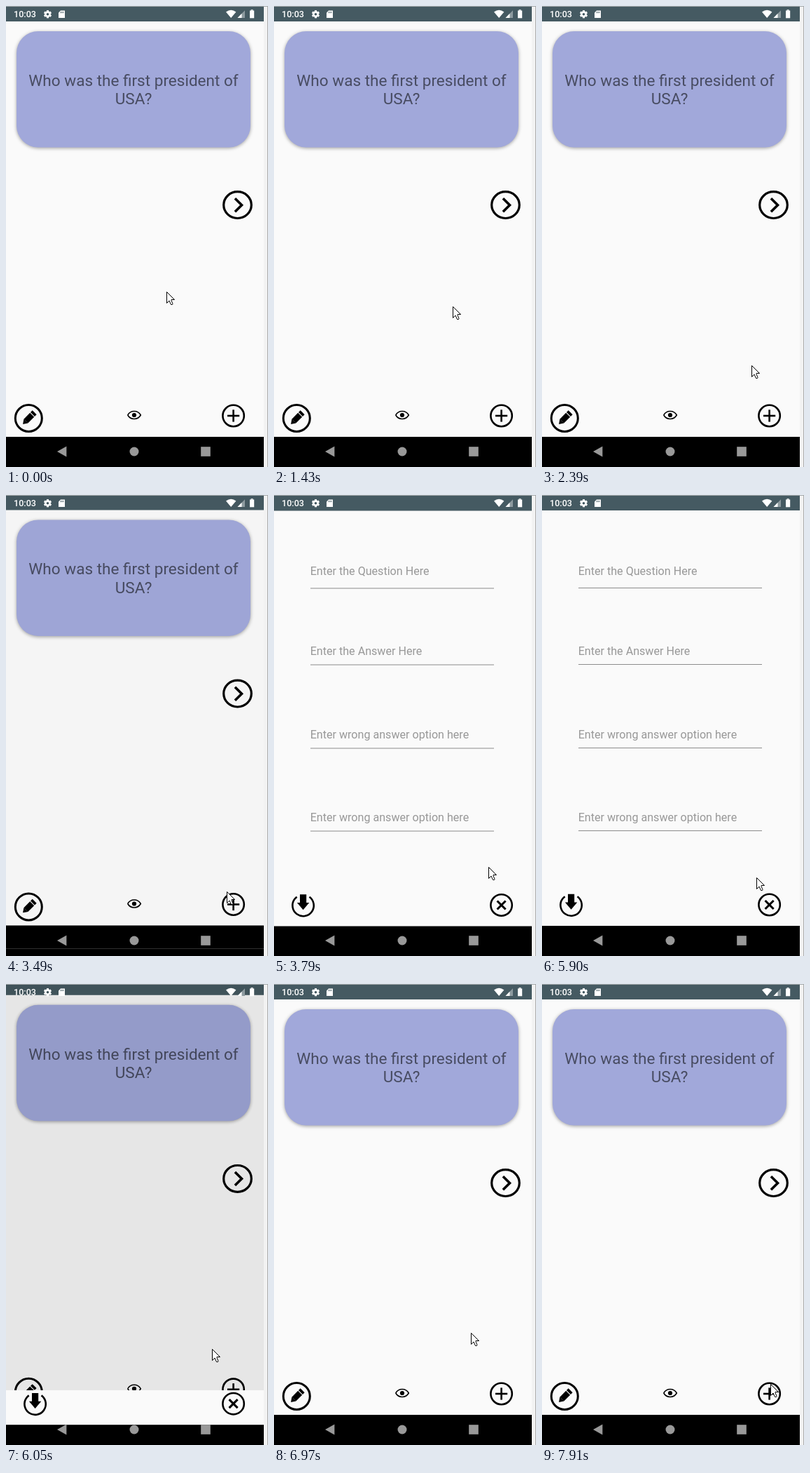
An HTML page with a canvas for the animation above (8 s loop, 374 by 657 pixels).

```html
<!DOCTYPE html>
<html lang="en">
<head>
<meta charset="utf-8">
<title>Flashcards</title>
<style>
html, body { margin: 0; width: 100%; height: 100%; overflow: hidden; background: #fafafa; }
canvas { display: block; width: 374px; height: 657px; }
</style>
</head>
<body>
<canvas id="stage"></canvas>
<script>
const W = 374, H = 657, PHONE = 368, LOOP = 8000;
const STATUS = '#455a62', PAGE = '#fafafa', INK = '#000', TAU = Math.PI * 2;
const canvas = document.getElementById('stage');
const ctx = canvas.getContext('2d');
const ratio = window.devicePixelRatio || 1;
canvas.width = W * ratio;
canvas.height = H * ratio;

const clamp = v => Math.min(1, Math.max(0, v));
const ease = u => u * u * (3 - 2 * u);

// Pointer strokes: a curve through start, middle and end; a single point is a rest.
const strokes = [
  { from: 0, path: [[229, 407]] },
  { from: 1280, to: 2090, path: [[239, 414], [278, 455], [291, 493]] },
  { from: 2240, to: 2960, path: [[294, 498], [306.5, 535], [316, 577]] },
  { from: 3490, to: 4150, path: [[315, 565], [304, 524], [300, 507]] },
  { from: 4830, to: 5460, path: [[305, 525], [316, 566], [322, 584]] },
  { from: 5900, to: 6320, path: [[306, 545], [289, 510], [280, 490]] },
  { from: 6970, to: 7630, path: [[281, 497], [302, 532], [326, 575]] },
  { from: 7910, path: [[326, 570]] }
];

function pointerAt(t) {
  const { from, to, path: [a, b, c] } = strokes.findLast(s => s.from <= t);
  if (!to) return a;
  const steps = Math.round((to - from) / 132);
  const p = Math.floor(clamp((t - from) / (to - from)) * steps) / steps;
  const wa = (2 * p - 1) * (p - 1), wb = 4 * p * (1 - p), wc = p * (2 * p - 1);
  return a.map((v, i) => Math.round(wa * v + wb * b[i] + wc * c[i]));
}

// The form slides over the card page and back, in held steps of 150 ms.
function slideAt(t) {
  const steps = from => Math.floor((t - from) / 150);
  const closing = t >= 5900;
  const u = clamp(closing ? 0.517 * steps(5900) : 0.12 + 0.4 * steps(3490));
  const shown = closing ? 1 - u : u;
  const open = ease(shown);
  const wiped = ease(ease(Math.min(1, u * 1.38)));
  const formY = 27 * (1 - open);
  return {
    cardY: -13.1 * open,
    formY,
    dim: 0.115 * Math.sin(shown * Math.PI / 2),
    clipTop: formY + 630 * (closing ? wiped : 1 - wiped),
    formVisible: shown > 0
  };
}

function rect(x, y, w, h, color) {
  ctx.fillStyle = color;
  ctx.fillRect(x, y, w, h);
}

function trace(points) {
  ctx.beginPath();
  points.forEach(([x, y]) => ctx.lineTo(x, y));
}

function stroke(width, color = INK) {
  ctx.lineWidth = width;
  ctx.strokeStyle = color;
  ctx.stroke();
}

function poly(points, color) {
  trace(points);
  ctx.closePath();
  ctx.fillStyle = color;
  ctx.fill();
}

function line(points, width) {
  trace(points);
  stroke(width);
}

function disc(x, y, r, color) {
  ctx.beginPath();
  ctx.arc(x, y, r, 0, TAU);
  ctx.fillStyle = color;
  ctx.fill();
}

function ring(x, y, rx, ry, width, from = 0, to = TAU) {
  ctx.beginPath();
  ctx.ellipse(x, y, rx, ry, 0, from, to);
  stroke(width);
}

function text(str, x, y, size, color, align = 'left', weight = 400) {
  ctx.font = `${weight} ${size}px Roboto, sans-serif`;
  ctx.textAlign = align;
  ctx.fillStyle = color;
  ctx.fillText(str, x, y);
}

function cross(x, y, r, width) {
  line([[x - r, y], [x + r, y]], width);
  line([[x, y - r], [x, y + r]], width);
}

function moved(x, y, angle, draw) {
  ctx.save();
  ctx.translate(x, y);
  ctx.rotate(angle);
  draw();
  ctx.restore();
}

function pageBase() {
  rect(0, 0, PHONE, H, PAGE);
  rect(0, -1, PHONE, 23, STATUS);
  rect(0, 614, PHONE, 80, INK);
}

function eye(x, y) {
  ctx.beginPath();
  ctx.moveTo(x - 9.3, y);
  ctx.bezierCurveTo(x - 5, y - 7.3, x + 5, y - 7.3, x + 9.3, y);
  ctx.bezierCurveTo(x + 5, y + 7.3, x - 5, y + 7.3, x - 9.3, y);
  stroke(1.6);
  disc(x, y, 3.1, INK);
}

function pencil() {
  rect(-6, -4.2, 12.5, 8.4, INK);
  rect(7.6, -4.2, 3.8, 8.4, INK);
  poly([[-6, -4.2], [-6, 4.2], [-12, 0]], INK);
}

function cardPage() {
  pageBase();
  ctx.save();
  ctx.shadowColor = 'rgba(0,0,0,.36)';
  ctx.shadowBlur = 5 * ratio;
  ctx.shadowOffsetY = 1.2 * ratio;
  ctx.beginPath();
  ctx.roundRect(15, 36, 334, 165.5, 31);
  ctx.fillStyle = '#a1a8da';
  ctx.fill();
  ctx.restore();
  text('Who was the first president of', 182, 114, 22.56, '#484c62', 'center');
  text('USA?', 182, 140.3, 22.56, '#484c62', 'center');

  ring(330.5, 283.6, 19.8, 18.9, 3.2);
  line([[326.9, 274.3], [336.5, 283.8], [326.9, 293.3]], 3.6);
  ring(32.3, 587.5, 19, 19, 3);
  moved(32.6, 587.4, -Math.PI / 4, pencil);
  eye(183, 583);
  ring(324.6, 584, 15.2, 15.2, 2.6);
  cross(324.6, 584, 8.6, 2.6);
}

function field(hint, under, gap) {
  text(hint, 51.7, under - gap, 16.1, '#989898');
  rect(52, under, 262, 1, '#8c8c8c');
}

function formPage() {
  pageBase();
  field('Enter the Question Here', 132, 18);
  field('Enter the Answer Here', 241, 13);
  field('Enter wrong answer option here', 360, 13.5);
  field('Enter wrong answer option here', 478, 13);

  ring(41.6, 584.5, 15.2, 15.2, 2.6, -Math.PI * 0.3, Math.PI * 1.3);
  poly([[37, 568.7], [46.2, 568.7], [46.2, 580.5], [50.3, 580.5],
    [41.6, 590.8], [32.9, 580.5], [37, 580.5]], INK);
  ring(324.6, 584, 15.2, 15.2, 2.6);
  moved(324.6, 584, Math.PI / 4, () => cross(0, 0, 8.5, 3.1));
}

function gear(x, y) {
  ctx.beginPath();
  ctx.arc(x, y, 3.1, 0, TAU);
  stroke(2.6, '#fff');
  for (let i = 0; i < 6; i++) {
    moved(x, y, (i + 0.5) * TAU / 6, () => rect(3.4, -1.5, 2.2, 3, '#fff'));
  }
}

function systemBars() {
  text('10:03', 11, 16.4, 12.6, '#fff', 'left', 500);
  gear(59.5, 11.7);
  poly([[78, 6.5], [84, 6.5], [84, 17], [75, 17], [75, 9.5]], '#fff');
  for (let x = 77.6; x < 83; x += 1.9) rect(x, 8, 0.9, 2.2, STATUS);

  ctx.beginPath();
  ctx.moveTo(321.2, 17);
  ctx.lineTo(314, 8.6);
  ctx.quadraticCurveTo(321.2, 3, 328.4, 8.6);
  ctx.fillStyle = '#fff';
  ctx.fill();
  poly([[330.5, 17], [341, 17], [341, 6.2]], '#8d9a9f');
  poly([[330.5, 17], [336.5, 17], [336.5, 10.8]], '#fff');
  rect(348, 6.5, 6.2, 10.8, '#fff');
  rect(349.6, 5.2, 3, 1.5, '#fff');

  poly([[73, 635], [86.4, 627.6], [86.4, 642.4]], '#999');
  disc(183, 635, 6.5, '#999');
  rect(278.2, 628.2, 13.6, 13.6, '#999');
}

function frameEdge() {
  rect(PHONE, 0, W - PHONE, H, '#f2f2f2');
  rect(373, 0, 1, H, '#ababab');
  rect(0, 0, W, 1, '#a3a9ab');
}

function arrow() {
  poly([[0, 0], [0, 16], [3.5, 12.5], [6, 18], [8, 18], [8.5, 17],
    [6.5, 12], [6.5, 11], [11, 11]], '#fff');
  stroke(1);
}

function render(t) {
  const { cardY, formY, dim, clipTop, formVisible } = slideAt(t);
  const [px, py] = pointerAt(t);
  ctx.setTransform(ratio, 0, 0, ratio, 0, 0);
  rect(0, 0, W, H, INK);
  moved(0, cardY, 0, cardPage);
  rect(0, 0, PHONE, H, `rgba(0,0,0,${dim})`);
  if (formVisible) {
    ctx.save();
    ctx.beginPath();
    ctx.rect(0, clipTop, PHONE, H);
    ctx.clip();
    moved(0, formY, 0, formPage);
    ctx.restore();
  }
  systemBars();
  frameEdge();
  moved(px + 0.5, py + 0.5, 0, arrow);
}

const start = performance.now();
function tick() {
  render((performance.now() - start) % LOOP);
  requestAnimationFrame(tick);
}
tick();
</script>
</body>
</html>
```
